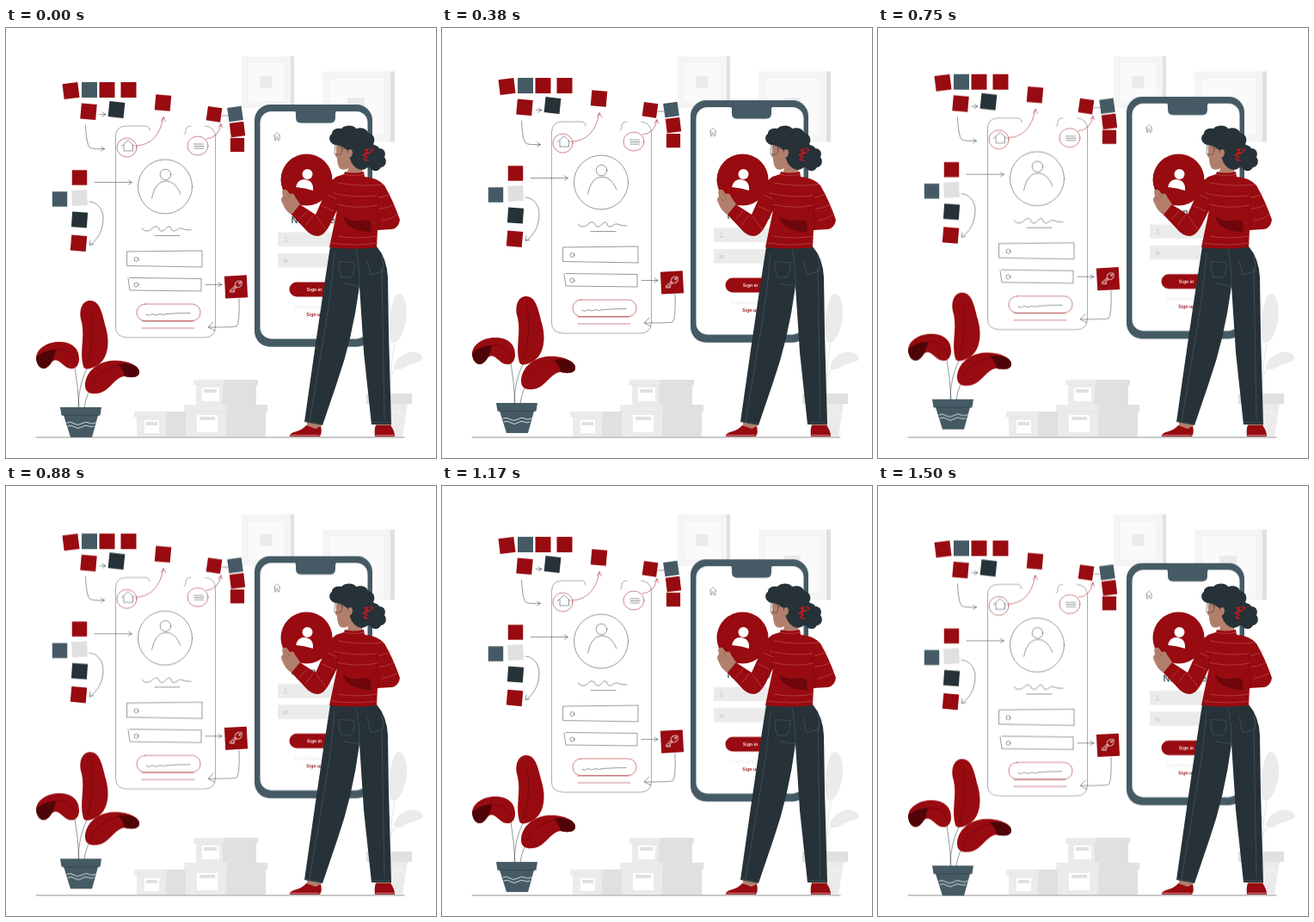
These frames come from a looping animation (500x500 px, 1.54 s). An HTML page without scripts:

```html
<!DOCTYPE html>
<html lang="en">
<head>
<meta charset="utf-8">
<title>App design</title>
<style>
  :root { --red: #980b10; --slate: #455a64; --dark: #263238; --wine: #4f0508; --skin: #b27f6c; }
  html, body { margin: 0; width: 100%; height: 100%; overflow: hidden; background: #fff; }
  svg { display: block; width: 100%; height: 100%; }
  .float { animation: float 1540ms linear -38ms infinite; }
  @keyframes float {
    0%, 100% { transform: translateY(.4px); }
    50% { transform: translateY(-9.6px); }
  }
  .red { fill: var(--red); }
  .slate { fill: var(--slate); }
  .dark { fill: var(--dark); }
  .wine { fill: var(--wine); }
  .skin { fill: var(--skin); }
  .g1 { fill: #fafafa; }
  .g2 { fill: #f5f5f5; }
  .g3 { fill: #ebebeb; }
  .g4 { fill: #e0e0e0; }
  .white { fill: #fff; }
  .line { fill: none; stroke: var(--dark); stroke-width: .5; stroke-linecap: round; stroke-linejoin: round; }
  .line.r { stroke: var(--red); }
  .line.w { stroke: #fff; }
  .line.pale { stroke: #ebebeb; }
  .line.knit { stroke: #c9666a; }
  .line.seam { stroke: #55646c; }
  text { font-family: Inter, "Open Sans", sans-serif; font-weight: 600; font-size: 5.3px; text-anchor: middle; }
</style>
</head>
<body>
<svg viewBox="0 0 500 500">
  <defs>
    <rect id="chip" x="-9" y="-9" width="18" height="18"/>
    <path id="head" d="M-4-2.500 0 0-4 2.500"/>
  </defs>

  <!-- wall frames -->
  <path class="g4" d="M331 33h4v60h-4zM447 50.500h5v82h-5z"/>
  <path class="g2" d="M274 33h57v60h-57zM368 50.500h79v82h-79z"/>
  <path class="g1" d="M281 40h44v46h-44zM376 58h64v67h-64z"/>
  <path class="line pale" d="M274 33l7 7h44v46h-44V40M331 33l-6 7M325 86l6 7M281 86l-7 7M368 50.500l8 7.500h64v67h-64V58M447 50.500l-7 7.500M440 125l7 7"/>
  <path class="g3" d="M295.500 56h14v14h-14zM397 81h20v20h-20z"/>

  <!-- storage boxes -->
  <path class="g4" d="M186 446h24v29h-24zM256 438h48v8h-2v29h-46zM252 409h41v6h-2v23h-39z"/>
  <path class="g3" d="M149 446h38v6h-1v23h-34v-23h-3zM207 438h50v8h-1v29h-47v-29h-2zM218 409h36v6h-2v23h-31v-23h-3z"/>
  <path class="line" style="stroke:#dcdcdc" d="M149 452h58M207 446h97M218 415h75"/>
  <path class="white" d="M161 456h17v15h-17zM222 450h24v20h-24zM228 418h20v16h-20z"/>
  <path class="g4" d="M163 458h13v4h-13zM225 452h18v4h-18zM230 420h15v4h-15z"/>

  <!-- pale plant -->
  <path class="line pale" style="stroke-width:1.200" d="M446 428q1-35 7-68M444 428q2-30 15-38"/>
  <path class="g3" d="M447 362c-3-20 1-50 9-53 9 0 12 18 9 33-3 14-9 24-14 24-3 0-4-2-4-4zM451 393c3-11 15-18 25-16 8 1 10 8 7 10-9 3-14 4-20 8-5 3-12 3-12-2zM424 437h43l-6 38h-31z"/>
  <path class="g4" d="M419 425h53v12h-53z"/>
  <path class="line w" d="M428 445l6 5 7-5 7 5 7-5 8 5"/>

  <path class="line" d="M35 476h428" style="stroke:#777;stroke-width:.8"/>

  <g class="float">
    <!-- phone -->
    <rect class="slate" x="289" y="89.200" width="137" height="281.600" rx="18"/>
    <rect class="white" x="295.500" y="97" width="125" height="264.500" rx="13"/>
    <path class="slate" d="M333 95h54q-4 1-4 5v4q0 6.500-6 6.500h-34q-6 0-6-6.500v-4q0-4-4-5z"/>
    <path class="line" style="stroke-width:.4" d="M311 126l4-4.500 4 4.500M312.500 125v5.500h1.500v-3.500h2v3.500h2V125"/>
    <text class="slate" x="357" y="227" style="font-size:10.500px">Nickname</text>
    <path class="g3" d="M316 237.500h82v16.500h-82zM316 262h82v16.500h-82z"/>
    <g fill="#d8d8d8"><circle cx="325" cy="244" r="1.500"/><path d="M322 249q3-5 6 0zM322.500 269h5v4h-5z"/></g>
    <rect class="red" x="329.500" y="295.500" width="60" height="17" rx="8.500"/>
    <text class="white" x="358.500" y="305.700">Sign in</text>
    <text x="358" y="326" style="fill:#e8e8e8;font-weight:400">Forgot password?</text>
    <text class="red" x="359" y="335">Sign up</text>

    <!-- wireframe -->
    <path class="line" d="M167 119q0-5-5-5h-22q-12 0-12.500 12v222q0 11 13 12h90q12 0 13-12V127q0-12-12-13M215 114q-6 0-6 5 0 5-2 5" opacity=".8"/>
    <ellipse class="line r" cx="140.500" cy="139" rx="11.500" ry="11"/>
    <ellipse class="line r" cx="223" cy="137" rx="12" ry="11"/>
    <path class="line" d="M134.500 137.500l7.500-7 7 7M137 136v7h10.500v-7M218.500 135h11M219 137.500h11M219 140h10.500"/>
    <path class="line r" d="M151 137q26-1 32-33M180.500 108l2.700-4.500 2.300 5M233 129q14-1 17-17M247 115l3-3.500 1.500 4.500"/>
    <g class="line">
      <circle cx="185" cy="184.500" r="31.500"/>
      <circle cx="185.500" cy="170.500" r="6.300"/>
      <path d="M169.500 198q4-20 16.500-20 11 0 17 15"/>
      <path d="M158 233q3 4 7 3c5-1 6-6 10-5 4 0 2 6 7 5 4-1 5-6 8-5 3 0 1 5 5 5 4 0 5-4 9-3q4 2 11 2M173 241.500h29"/>
      <path d="M141 260l87-1v19l-87-1.500zM144 290.500l83 1V306l-83-1-2-14"/>
      <circle cx="151.500" cy="269" r="2.500"/><circle cx="151.500" cy="298.500" r="2.500"/>
      <path d="M163 333.500q4 2 7-1 4 3 9 0 3 2 8 0 12-1 27-1"/>
    </g>
    <rect class="line r" x="152" y="321" width="74" height="19.500" rx="9.500"/>
    <path class="line r" d="M158 349h61M158 341h60"/>

    <!-- connectors -->
    <path class="line" d="M92.500 113q1 23 5 26 2 2 17 1.500M103 179.500h43M109 100.500h7M251 102h7M232 298.500h19M271 315q1 29-3 32-4 1-32 1M241 342l-6 6 8 4M97 202c10 0 16 10 16 19 0 14-6 25-15 31M98 247l-1 5.500 5-1"/>
    <g class="line">
      <use href="#head" x="114.500" y="140.500"/><use href="#head" x="146.500" y="179.500"/>
      <use href="#head" x="116" y="100.500"/><use href="#head" x="251" y="298.500"/>
    </g>

    <!-- swatches -->
    <g class="red">
      <use href="#chip" transform="translate(75.500 73) rotate(-7)"/>
      <use href="#chip" x="117.500" y="72"/>
      <use href="#chip" x="142.500" y="72"/>
      <use href="#chip" transform="translate(96 97.300) rotate(5)"/>
      <use href="#chip" transform="translate(182.500 87) rotate(5)"/>
      <use href="#chip" transform="translate(242 100.300) rotate(8) scale(.92)"/>
      <use href="#chip" transform="translate(269 118) rotate(-7) scale(.92)"/>
      <use href="#chip" transform="translate(269 136) scale(.9)"/>
      <use href="#chip" transform="translate(85.500 174) scale(.97)"/>
      <use href="#chip" transform="translate(84.500 250.300) rotate(5)"/>
      <use href="#chip" transform="translate(267.500 301) rotate(-3) scale(1.440)"/>
    </g>
    <g class="slate">
      <use href="#chip" x="97" y="72"/>
      <use href="#chip" transform="translate(266.500 100) rotate(-8) scale(.92)"/>
      <use href="#chip" transform="translate(62.500 199) scale(.97)"/>
    </g>
    <g class="dark">
      <use href="#chip" transform="translate(128.500 95) rotate(6)"/>
      <use href="#chip" transform="translate(85.500 223) rotate(4)"/>
    </g>
    <use class="g4" href="#chip" transform="translate(85.500 197.500) rotate(-3)"/>
    <g class="line w" style="stroke-width:.8" transform="translate(267.500 300.500) rotate(-42)">
      <ellipse cx="4" rx="4.500" ry="3.500"/><circle cx="5.500" r="1"/>
      <path d="M0-1h-9v2h2v2h2V1h5"/>
    </g>

    <!-- plant -->
    <path class="line" d="M85 442q-1-24-5-48M84 442q0-26 10-46M91 442q2-18 11-26"/>
    <path class="red" d="M90 394c-5-17 2-34-2-52-4-13 0-24 9-25 12-1 15 15 19 31 6 21 2 43-18 48-5 1-7 0-8-2z"/>
    <path class="red" d="M35 383c1-10 12-17 24-18 16-1 26 6 26 20 0 8-5 12-10 11-9-1-13-13-20-9-4 2-5 8-11 9-6 0-9-7-9-13z"/>
    <path class="wine" d="M35 383c5-5 14-9 23-9-2 10-6 21-14 22-6 0-9-7-9-13z"/>
    <path class="red" d="M92 416c0-14 11-26 29-29 18-2 34 5 34 13 0 7-10 7-17 5-8 0-14 10-22 16-8 6-24 7-24-5z"/>
    <path class="wine" d="M130 391c13-3 25 2 25 9 0 7-10 7-17 5-1-6-4-10-8-14z"/>
    <path class="line" style="stroke:#5c070a" d="M95 390q9-28 4-60M82 390q-7-19-26-16M98 416q10-18 32-24"/>
    <path class="slate" d="M63 441h48l-1.500 9.500H107L100 476H75l-8-25.500h-2.500z"/>
    <path class="line" d="M66 450.500h42"/>
    <path class="line w" style="stroke-width:.8" d="M71 459q4-2 8 1t9 0 8-1 8 0M72 463q4-2 8 1t8 0 8-1 6 0"/>
  </g>

  <!-- avatar -->
  <circle class="red" cx="349.500" cy="176.500" r="30"/>
  <g class="white">
    <circle cx="350.500" cy="170" r="6"/>
    <path d="M337 185q2-9 10-9 11 1 10 13-9-3-20-4z"/>
  </g>

  <!-- woman: legs -->
  <path class="skin" d="M350 456l17 3-2 10-15-4zM430 458h18v7h-18z"/>
  <path class="red" d="M330 474q0-3 8-5 7-2 11-7l11 4 6-3q2 7-1 12h-35zM429 475q-1-8 1-13h17q5 6 5 13z"/>
  <path class="line w" d="M331 473.500h33M430 473.500h21"/>
  <path class="dark" d="M377 254h54q12 14 13 36l1 64 3 107h-23l-9-84-5-77q-8 61-26 112l-17 50-21-4 12-84 10-68z"/>
  <path class="line seam" d="M382 262q-4 50-14 105l-15 90M411 300q0-25-4-42M437 280l3 175M387 272q-1 9 3 18l11 0q5-8 4-17zM420 270l4 17 14-4q2-8-1-17M348 457l19 4M425 459h22M411 300l-18-3"/>

  <!-- woman: head -->
  <path class="skin" d="M386 134q-3 5-2 9l-1 6 2 2q0 9 4 13 5 2 9-1l-2 8 18 1 1-16-4-22z"/>
  <path class="dark" d="M385 136c-8 0-12-9-6-13 0-6 7-7 11-6 5-5 15-4 17 0 8-2 13 1 14 5 7 1 9 8 6 13 4 3 1 9-3 11l2 8q-4 10-12 11-8-1-12-8-4-8-5-15-6-5-12-6z"/>
  <path class="dark" d="M418 141c4-8 15-5 16-1 7 0 8 7 6 10 4 5 1 12-4 12-3 6-11 5-13 0-6 1-11-6-8-10-2-4 0-9 3-11z"/>
  <path class="skin" d="M398 142q4-3 5 2 0 7-5 7z"/>
  <path class="line" d="M383 137h7q2 7-1 10h-7q0-5 1-10zM390 140l9 0"/>
  <path class="line r" style="stroke:#c51a20;stroke-width:1.400" d="M417 142l4-1-3 4 5 0-8 3 5 2-4 3 5 1M424 140l3 2-3 2"/>

  <!-- woman: sweater -->
  <path class="red" d="M394 167q11 3 22 0l1 6q15 1 23 10 10 17 18 40-1 9-9 11l-17 1-1 20q-28 3-55 0l9-43-9 18q-6 11-13 12-9 0-16-9l-17-18 10-11 20 13 8-18q5-19 16-26l9-3z"/>
  <path fill="#6d070b" d="M392 219q8 6 18 5 8-2 14 1l1 12q-13 1-23-5-8-4-10-13z"/>
  <path class="line knit" d="M393 170q11 3 24 0M386 180q25 5 52 2M381 192q23 6 50 3M384 205q25 6 48 1M386 242q22 4 46 0M379 250q28 4 53 0M433 197q9-1 14-5M434 210q10 0 17-5M437 224q12-2 19-8M374 194l11 5M368 207l13 6M361 219l11 15M350 213l-8 9M357 218l-8 11"/>
  <path class="line" style="stroke:#6d070b" d="M386 190l-2 22M432 195l1 40"/>

  <!-- woman: hand -->
  <path class="skin" d="M342 205l-10 12q-7-4-10-12-4-7 0-9l-1-6q3-4 6-1l3 4q5-2 6 3z"/>
  <path class="line" style="stroke:#8e5c4c" d="M323 196l5 6M327 193l4 6"/>
</svg>
</body>
</html>
```
